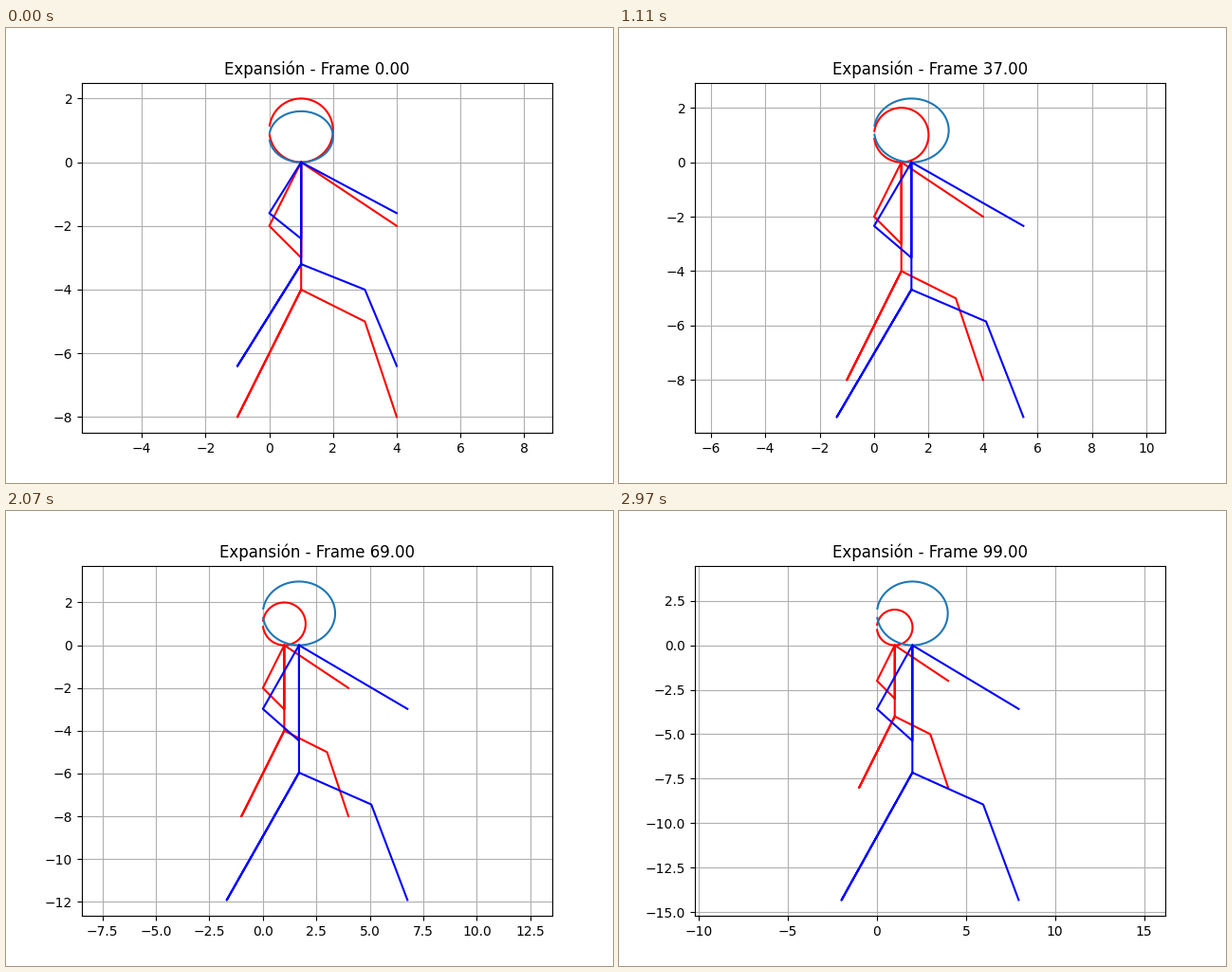
A matplotlib script for the animation above (3 s loop, 640 by 480 pixels).

```python
import numpy as np
import matplotlib.pyplot as plt
from matplotlib.animation import FuncAnimation

FRAMES = 100
INTERVAL = 30

# Key joints of the stick figure
neck, hip = (1, 0), (1, -4)
elbow, left_hand, right_hand = (0, -2), (1, -3), (4, -2)
left_foot, knee, right_foot = (-1, -8), (3, -5), (4, -8)

# One stroke that retraces the torso and the straight leg
BODY = np.array([right_hand, neck, elbow, left_hand, neck,
                 hip, left_foot, hip, knee, right_foot])

angle = np.arange(-3, 3, 0.01)
HEAD = 1 + np.column_stack((np.cos(angle), np.sin(angle)))

fig, ax = plt.subplots(figsize=(6.4, 4.8), dpi=100)


def draw_figure(scale, head_color, body_color):
    for points, color in ((HEAD, head_color), (BODY, body_color)):
        ax.plot(*(points * scale).T, color=color)


def update(i):
    growth = i / FRAMES
    ax.clear()
    draw_figure((1, 1), "red", "red")
    draw_figure((1 + growth, 0.8 + growth), "C0", "blue")
    ax.axis("equal")
    ax.grid(True)
    ax.set_title(f"Expansión - Frame {i:.2f}")


anim = FuncAnimation(fig, update, frames=FRAMES, interval=INTERVAL,
                     init_func=lambda: None, repeat=True, repeat_delay=0)
plt.show()
```
